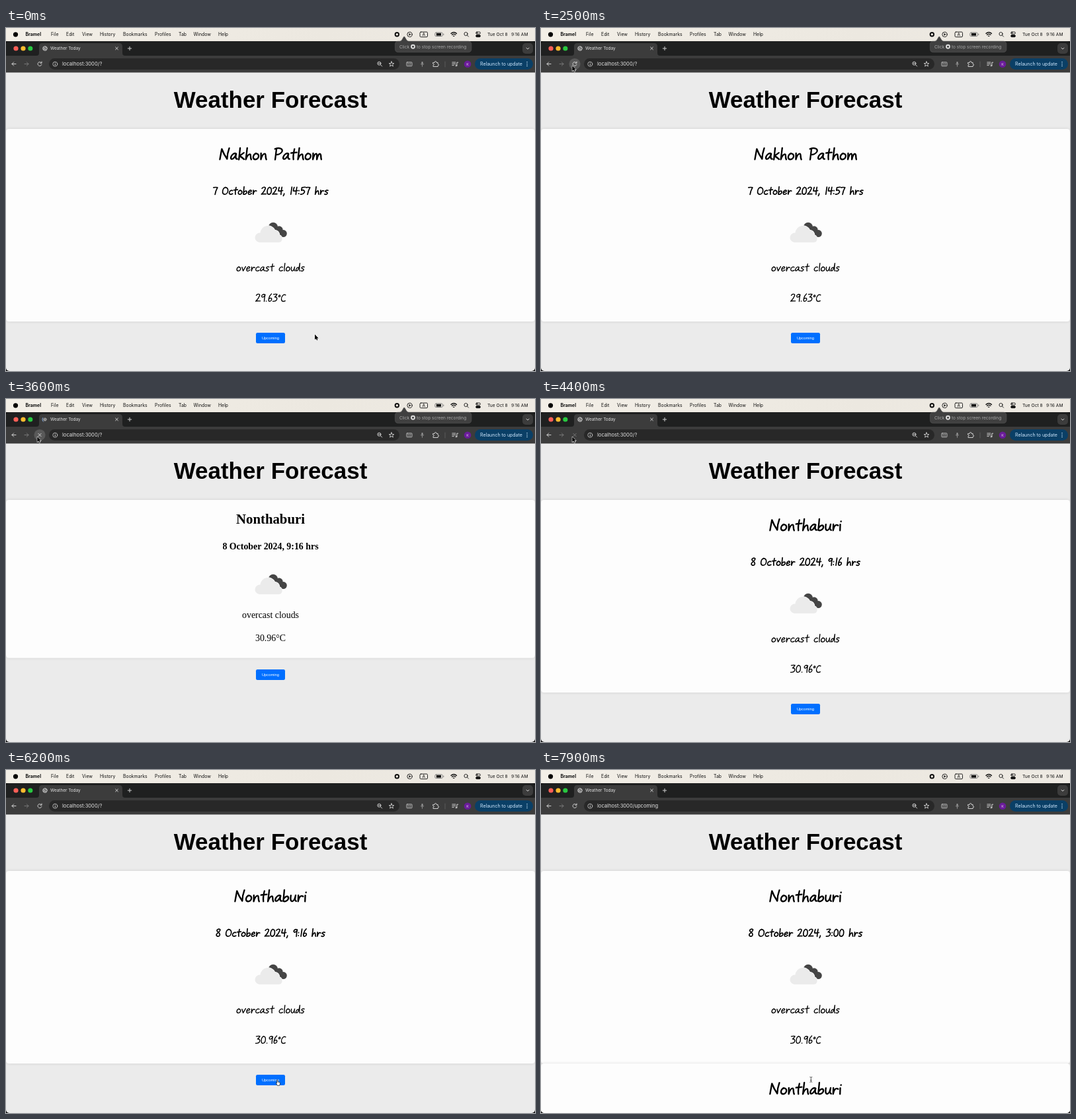
Write an HTML page that moves like this. It is 800x520 px and loops after 8 s.

```html
<!DOCTYPE html>
<html lang="en">
<head>
<meta charset="utf-8">
<title>Weather Today</title>
<style>
html, body { margin: 0; width: 100%; height: 100%; overflow: hidden; background: #111 }
svg { display: block; width: 800px; height: 520px; font-family: Inter, Roboto, sans-serif; white-space: pre }
.line { fill: none; stroke-linecap: round; stroke-linejoin: round }
.serif { font-family: "Liberation Serif", Times, serif; text-anchor: middle }
.arial { font-family: "Liberation Sans", Arial, sans-serif; text-anchor: middle }
</style>
</head>
<body>
<svg viewBox="0 0 800 520">
  <defs>
    <linearGradient id="bar">
      <stop offset="0" stop-color="#f3efe7"/><stop offset=".6" stop-color="#ece8e0"/><stop offset="1" stop-color="#eeeae3"/>
    </linearGradient>
    <filter id="shade" x="-5%" y="-5%" width="110%" height="110%">
      <feDropShadow dx="0" dy="0" stdDeviation="2.2" flood-opacity=".13"/>
    </filter>
    <clipPath id="window"><rect y="20" width="800" height="500" rx="5"/></clipPath>
  </defs>

  <!-- menu bar -->
  <rect width="800" height="20" fill="url(#bar)"/>
  <circle cx="14.5" cy="9.8" r="3.6"/>
  <g id="menu" font-size="6.9" fill="#111"></g>
  <g fill="#111" font-size="6.7"><text x="728" y="12">Tue Oct 8</text><text x="764" y="12">9:16 AM</text></g>
  <g class="line" stroke="#111" stroke-width=".9">
    <circle cx="591.3" cy="9.8" r="2.7" stroke-width="2"/>
    <circle cx="610.5" cy="9.8" r="3.7"/><path d="M609.6 8.2v3.2l2.5-1.6z" fill="#111" stroke-width=".3"/>
    <rect x="626" y="6" width="11.5" height="7.6" rx="1.5"/>
    <rect x="648.8" y="6.9" width="11.4" height="5.6" rx="1.6" stroke="#777"/>
    <path d="M650.8 9.7h7.2" stroke-width="3.8" stroke-linecap="butt"/><path d="M661.8 9v1.5" stroke="#777"/>
    <path d="M673 8.4q4.2-3.6 8.4 0M674.6 10.2q2.6-2.1 5.2 0M676.4 12.1h1.5" stroke-width="1.4"/>
    <circle cx="695.5" cy="9" r="2.6"/><path d="M697.5 11l2 2.1"/>
    <rect x="710.6" y="6" width="6.8" height="3" rx="1.5"/><rect x="710.6" y="10.6" width="6.8" height="3" rx="1.5" fill="#111"/>
    <path d="M712.2 7.5h.4" stroke-width="1.5"/>
  </g>
  <text x="631.8" y="12.1" font-size="6.4" text-anchor="middle">A</text>

  <g clip-path="url(#window)">
    <rect y="67" width="800" height="453" fill="#ebebeb"/>
    <text class="arial" x="400" y="121.3" font-size="34.95" font-weight="700">Weather Forecast</text>
    <g id="pages"></g>

    <!-- tab strip and toolbar -->
    <rect y="20" width="800" height="23" fill="#1f2020"/>
    <rect y="42" width="800" height="25.5" fill="#3c3c3c"/>
    <path d="M46 42q4 0 4-4v-10q0-5 5-5h116q5 0 5 5v10q0 4 4 4z" fill="#3c3c3c"/>
    <circle cx="15" cy="31" r="3.6" fill="#ff5f57"/><circle cx="26" cy="31" r="3.6" fill="#febc2e"/><circle cx="36.8" cy="31" r="3.6" fill="#28c840"/>
    <rect x="781" y="23" width="16" height="16" rx="5" fill="#3c3c3c"/>
    <rect x="65" y="46" width="530" height="17" rx="8.5" fill="#282828"/>
    <rect x="709" y="46" width="88" height="17" rx="8.5" fill="#0a3f66"/>
    <circle cx="698" cy="54.7" r="5.3" fill="#6a1b9a"/>
    <text x="698" y="56.6" font-size="5.2" fill="#e6d5ee" text-anchor="middle">K</text>
    <text x="717" y="57.2" font-size="7" fill="#cfe8ff">Relaunch to update</text>
    <path class="line" d="M788 51.8v0m0 2.9v0m0 2.9v0" stroke="#cfe8ff" stroke-width="1.5"/>
    <text id="title" x="67" y="33.3" font-size="6.4" fill="#e3e3e3"></text>
    <text id="url" x="85" y="57.3" font-size="7.6" fill="#e3e3e3"></text>
    <circle id="hover" cx="51" cy="54.5" r="8.6" fill="#595959"/>

    <g class="line" stroke="#d0d0d0" stroke-width="1">
      <path d="M165.6 29l3.8 3.8m0-3.8l-3.8 3.8M184.3 31h5.4m-2.7-2.7v5.4M787 30.1l2 2 2-2"/>
      <path d="M15 54.5h-6m2.7-2.7l-2.7 2.7 2.7 2.7"/>
      <path d="M28 54.5h6m-2.7-2.7l2.7 2.7-2.7 2.7" stroke="#777"/>
      <path id="reload" d="M53.6 52.9a3 3 0 1 0 .3 2.6M54 51v2.2h-2.2"/>
      <path id="stop" d="M48.8 52.3l4.4 4.4m0-4.4l-4.4 4.4"/>
      <circle cx="74.3" cy="54.7" r="3.5" stroke-width=".8"/><path d="M74.3 54.3v2.1m0-3.7v0"/>
      <circle cx="564.4" cy="53.7" r="2.5"/><path d="M566.3 55.6l2.3 2.4m-5.3-4.3h2.2"/>
      <path d="M583 50.8l1 2.7 2.8.1-2.2 1.7.8 2.8-2.4-1.6-2.4 1.6.8-2.8-2.2-1.7 2.8-.1z" stroke-width=".9"/>
      <rect x="605.8" y="51.8" width="8.2" height="6" rx="1" stroke-width=".8"/>
      <path d="M607.5 53.6h1.5m1.5 0h1.6m-4.6 2.3h1m1.5 0h2" stroke-width=".8"/>
      <path d="M629.5 52.1v2.2" stroke="#999" stroke-width="2.2"/><path d="M627.3 54.5q2.2 3.6 4.4 0m-2.2 2v2" stroke="#999" stroke-width=".8"/>
      <path d="M646 52.4h2.2q.1-2 1.4-2t1.4 2h2.1v2.3q1.5.2 1.5 1.2t-1.5 1.2v1.4h-7.1v-2q1.4-.2 1.4-1.1t-1.4-1.1z"/>
      <path d="M664 51v8" stroke="#5b5b5b"/>
      <path d="M674.8 52h5m-5 2.3h5m-5 2.3h2.5m4.6.6v-5h1.8"/><circle cx="680.8" cy="57" r=".9"/>
    </g>
    <g id="globe" class="line" stroke="#bdbdbd" stroke-width=".9">
      <circle r="3.3" fill="#666"/><path d="M-2.8-1.5q2 0 2.2 1.5t2 1.3V3M0-3q0 2 2.8 1.6M-3 .8h1.5l.5 1.7"/>
    </g>
    <path id="spinner" class="line" d="M0-4.1a4.1 4.1 0 0 1 4.1 4.1" stroke="#8fb8ec" stroke-width=".9"/>
  </g>

  <g id="tip">
    <path d="M593.5 20h2q2 0 3.5-2.5l2.3-4q.9-1 1.8 0l2.3 4q1.5 2.5 3.5 2.5h90q5 0 5 5v6.7q0 5-5 5h-105.5q-5 0-5-5v-6.7q0-5 5-5z" fill="#404040" stroke="#5c5c5c" stroke-width=".5"/>
    <g font-size="6.5" fill="#a9a9a9"><text x="595" y="30.6">Click</text><text x="621" y="30.6">to stop screen recording</text></g>
    <circle cx="615.5" cy="28.3" r="2.5" fill="none" stroke="#ddd" stroke-width="1.9"/>
  </g>

  <g id="cursor" stroke-linejoin="round">
    <path id="arrow" d="M0 0V8l1.9-1.7L3.1 9l1.3-.5-1.2-2.7h2.5z" stroke="#fff" stroke-width="1.1" paint-order="stroke"/>
    <path id="hand" d="M2 9L0 5.4q.3-1 1.4 0V1q.7-1 1.4 0v2.6l2.3.4q1 .2 1 1.2v1.8L5.3 9z" fill="#fff" stroke="#111" stroke-width=".7"/>
    <path id="beam" class="line" d="M-1.5-4q1.5 0 1.5 1v6q0 1-1.5 1M1.5-4Q0-4 0-3m0 6q0 1 1.5 1M-.8 1h1.6" stroke="#333" stroke-width=".8"/>
  </g>
</svg>
<script>
const $ = id => document.getElementById(id);

// Handwriting: advance and pen strokes of each letter, baseline at 0
const pen = {
  " ": [6.5, ""],
  a: [8, "M6-6C3-8 .3-3 1-1.2 2 .8 5.2-2 6-6 5.4-3 5.8-.5 7.6-.6"],
  b: [7.5, "M1.3-12 1.2-.5C4 .6 7-2 6-4.5 5-6.5 2.5-5 1.3-2.5"],
  c: [7, "M5.8-5.8C3.5-7.8 .5-4.2 .9-2.2 1.5 .4 4.5 0 6.2-1.2"],
  d: [7.3, "M5-5C2-7 0-2 1.3-.7 3 .5 5.5-3 5.8-12 5.5-6 5.5-2 6.5-.2"],
  e: [7.2, "M1-3C8-4 5.5-7.4 3.2-6.4 0-4.6 .5 .5 3.5-.2Q5-.6 6.2-1.8"],
  h: [7.8, "M1.6-12 1.2-.2C2-4 4-6 5.2-5.4 6.2-4.7 5.5-2 6.8-.2"],
  i: [4, "M1.5-6.3 1.8-.2M2-9.5v.2"],
  k: [7.2, "M1.5-12 1.3 0M5.8-7Q3-4.6 1.5-4 4-2.5 6.6-.3"],
  l: [3.5, "M1.7-12Q1.2-5 1.8-.2"],
  m: [11, "M1-6.5 1.3-.2C2-4 3-6.5 4.3-6 5.5-5.5 5-2 5.4-.2 6-4 7-6.5 8.3-5.8 9.7-5 9-2 10-.2"],
  n: [7.8, "M1-6.5 1.4-.2C2-4 3.5-6.5 5-6 6.4-5.5 5.6-2 7-.2"],
  o: [7.5, "M3.5-6.4C0-5.4 0-.5 3-.2 7 0 7.8-6.4 2.8-6.4"],
  r: [6.8, "M1.2-6.5 1.5-.2C2-4.6 3.5-7 6.2-5.3"],
  s: [7, "M5.7-6.2C3-7.4 .8-5.4 2-4.4 3.5-3.4 5.7-3.2 5-1.6 4 .3 2 0 .8-.6"],
  t: [7, "M3.7-11Q2.6-4 3.6-.2M.6-6.8 6.4-7.4"],
  u: [7.5, "M1-6.3C.8-3 1-.3 3-.3 5-.5 5.6-4 5.9-6.5 5.4-3 5.8-.6 7-.4"],
  v: [7, "M.7-6 3-.4 6.2-7"],
  C: [8, "M6.8-9.8C3-12 .5-7 1-3.5 1.8 1 5 0 7-1"],
  N: [11.5, "M1.2-.2 2.2-11Q5-5 8.6-.6 8.2-6 9.8-11.8"],
  O: [10, "M4.5-11C-.5-9.6-.5 0 4-.2 10-.5 10.5-10.6 4-10.9"],
  P: [9, "M2.2-11.2 1.8 0M.6-11C5-13 9.4-11 8-8 6.8-6 4-5 2-5"],
  0: [8.5, "M4-11C0-9.6 0-.5 3.6-.2 8.2-.4 8.5-10.6 3.5-11"],
  1: [4.3, "M2.6-11.4 2-.2"],
  2: [8.4, "M.9-9.2C2-12 6.5-12 6-8.8 5-5.5 3-2.5 .8-.4 3-1.2 5-.6 7.7-.8"],
  3: [8, "M.8-10.7Q4-11.7 6.3-11 5-8.2 3-6.8C8.5-7.2 8 0 .8-.3"],
  4: [8.4, "M1.8-11Q1-8 1-5.5 4-5 7.6-6M5.9-11.2Q5-5 5.4 0"],
  5: [7.5, "M6.7-11.3 2-10.7 1.6-6.3C5-8 7.5-5 6-2.5 5-.5 3 0 .8-.3"],
  6: [7, "M4.8-11.6C1-8 .3-1 2.5-.3 6 .3 7-5 4-5.2 2.5-5.2 1.5-4 1.2-3"],
  7: [8, "M.8-10.6Q4-11.4 6.8-10.6 4.5-6 4 0"],
  8: [8.3, "M6-10.2C4-12.6-.5-10.2 2-7.8 4.5-6 7.5-4 6-1.5 4 1-.5-1 1.5-4 3-6 7-8 6-10.6"],
  9: [7, "M5.8-9.6C3-12.6 0-9.2 1-7.2 2.5-5.2 5.5-7.8 5.8-10.4Q5-5 5.3 0"],
  ",": [3.6, "M1.8-1.3Q1.8 .8 .8 2"],
  ".": [3.5, "M1.3-.6v.3"],
  ":": [3.3, "M1.3-6v.3M1.3-1.5v.3"],
  "°": [4.5, "M2.2-9.6C.7-9.3 .7-7 2-7 3.7-7 3.7-9.4 2-9.6"]
};

function script(text, y, scale, weight) {
  let x = 0, strokes = "";
  for (const c of text) {
    strokes += `<path transform="translate(${x})" d="${pen[c][1]}"/>`;
    x += pen[c][0];
  }
  return `<g class="line" role="img" aria-label="${text}" stroke="#000" stroke-width="${weight}"
    transform="translate(${400 - x * scale / 2} ${y}) scale(${scale}) skewX(-5)">${strokes}</g>`;
}

const serif = (text, y, size, weight) =>
  `<text class="serif" x="400" y="${y}" font-size="${size}" font-weight="${weight}">${text}</text>`;

const clouds = y => `<g transform="translate(400 ${y})">
  <g fill="#454545"><circle cx="4" cy="-8.3" r="7"/><circle cx="13" cy="-4" r="5.7"/><circle cx="19.3" cy="1.6" r="5.5"/></g>
  <path d="M-17 15a7.2 7.2 0 0 1 1.5-14.4A11.6 11.6 0 0 1 6.5-3.6A7.3 7.3 0 0 1 13.5 4A5.6 5.6 0 0 1 12 15z"
    fill="#ebebeb" stroke="#fdfdfd" stroke-width="1.4" paint-order="stroke"/></g>`;

function card(city, date, temp, hand = true, dy = 0) {
  const sky = "overcast clouds";
  const text = hand
    ? script(city, 199.5, 1.47, 1.6) + script(date, 252.4, .99, 1.7) + script(sky, 368.6, 1, 1.35) + script(temp, 414.6, 1, 1.35)
    : serif(city, 189, 20.8, 700) + serif(date, 228, 13.9, 700) + serif(sky, 332.3, 13.9, 400) + serif(temp, 366.9, 13.9, 400);
  return `<g transform="translate(0 ${dy})">
    <rect y="153" width="800" height="${hand ? 292 : 239.5}" rx="4.5" fill="#fdfdfd" filter="url(#shade)"/>
    ${text}${clouds(hand ? 310 : 281)}</g>`;
}

const button = y => `<rect x="378" y="${y}" width="44" height="16" rx="2.3" fill="#006fff"/>
  <text class="arial" x="400" y="${y + 9.8}" font-size="5.8" fill="#fff">Upcoming</text>`;

const now = ["Nonthaburi", "8 October 2024, 9:16 hrs", "30.96°C"];
const later = ["Nonthaburi", "8 October 2024, 3:00 hrs", "30.96°C"];
$("pages").innerHTML = [
  card("Nakhon Pathom", "7 October 2024, 14:57 hrs", "29.63°C") + button(462),
  card(...now, false) + button(410),
  card(...now) + button(462),
  card(...later) + card(...later, true, 292)
].map(p => `<g>${p}</g>`).join("");
const pages = [...$("pages").children];

const menu = { File: 68, Edit: 91, View: 115, History: 142, Bookmarks: 177, Profiles: 225, Tab: 261, Window: 283.5, Help: 321 };
$("menu").innerHTML = '<text x="29.5" y="12" font-weight="700">Bramel</text>' +
  Object.entries(menu).map(([name, x]) => `<text x="${x}" y="12">${name}</text>`).join("");

// Cursor stops: time, x, y
const stops = [[0, 467, 464.6], [500, 467, 464.4], [1400, 124, 89], [1600, 124, 89], [2000, 47.3, 57.3],
  [4650, 47.3, 57.3], [5700, 408.3, 469.3], [8000, 408.3, 469.3]];

function cursorAt(t) {
  const i = stops.findIndex(s => s[0] > t);
  const [t0, x0, y0] = stops[i - 1], [t1, x1, y1] = stops[i];
  const k = (t - t0) / (t1 - t0), e = k * k * (3 - 2 * k);
  return [x0 + (x1 - x0) * e, y0 + (y1 - y0) * e];
}

const show = (id, on) => $(id).style.display = on ? "" : "none";

function draw(t) {
  const within = (a, b) => t >= a && t < b;
  const page = t < 3300 ? 0 : t < 4000 ? 1 : t < 7700 ? 2 : 3;
  pages.forEach((p, i) => p.style.display = i === page ? "" : "none");

  const leaving = within(7000, 7700), loading = within(2800, 4100) || leaving;
  const spent = within(4100, 4750);
  $("url").textContent = "localhost:3000/" + (t < 7000 ? "?" : "upcoming");
  $("title").textContent = leaving ? "localhost:3000/upcoming" : "Weather Today";
  show("reload", !loading && !spent);
  show("stop", loading || spent);
  $("stop").setAttribute("stroke", spent ? "#777" : "#d0d0d0");
  show("hover", within(1950, 4100));
  show("spinner", loading);
  $("spinner").setAttribute("transform", `translate(59 31) rotate(${t * .36})`);
  $("globe").setAttribute("transform", `translate(59 31) scale(${loading ? .65 : 1})`);
  $("tip").setAttribute("opacity", Math.min(1, Math.max(0, (4800 - t) / 300)));

  const [x, y] = cursorAt(t);
  const hand = within(5600, 7000), beam = t >= 7700;
  show("hand", hand);
  show("beam", beam);
  show("arrow", !hand && !beam);
  $("cursor").setAttribute("transform", `translate(${x} ${y})`);
}

function frame() {
  draw(performance.now() % 8000);
  requestAnimationFrame(frame);
}
frame();
</script>
</body>
</html>
```
